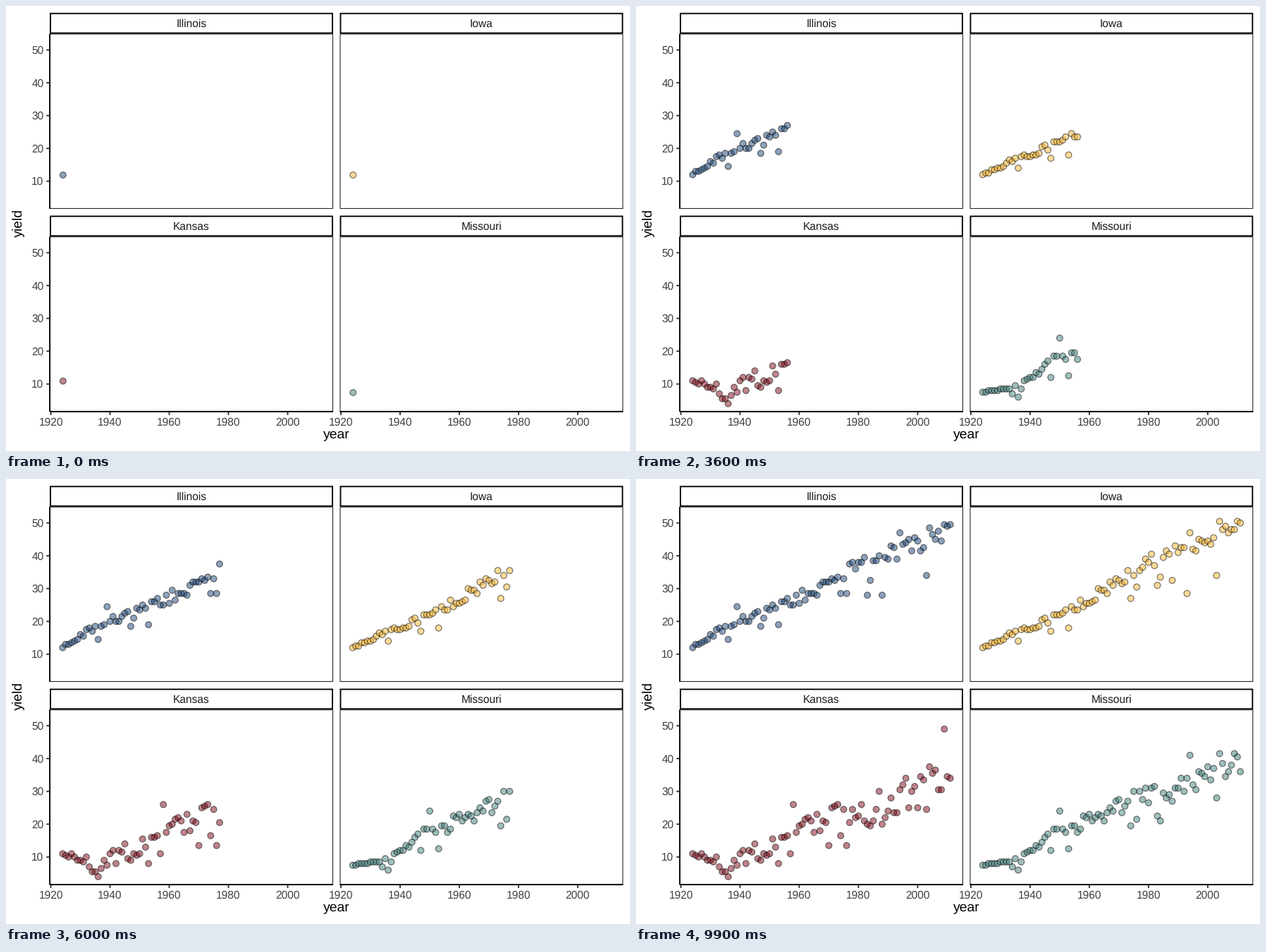
These frames come from a looping animation (885x632 px, 10000 ms). A matplotlib script:

```python
import matplotlib.pyplot as plt
import numpy as np
from matplotlib.animation import FuncAnimation
from matplotlib.collections import PatchCollection
from matplotlib.lines import Line2D
from matplotlib.patches import Circle, Rectangle

W, H, DPI = 885, 632, 100
FRAMES, INTERVAL = 100, 100
PT = 72 / DPI  # points per pixel

plt.rcParams["font.family"] = "Liberation Sans"
plt.rcParams["text.hinting"] = "none"

YEARS = np.arange(1924, 2012)
YEAR_PX, UNIT_PX = 4.199, 4.66
LEFTS, PANEL_W = (62.1, 473.5), 401.8
STRIP_TOP, PANEL_TOP, PANEL_BOTTOM, ROW_PITCH = 9.7, 39.4, 288.1, 288
TICK, LINE = 4.8, 1.88
SMALL, LARGE = 15.5, 19.4
RADIUS, STROKE = 4.38, 1.25

# Good and bad seasons felt in all four states
WEATHER = {1936: -3.5, 1947: -4.5, 1953: -4.5, 1974: -7, 1976: -5, 1983: -7.5,
           1984: -7.5, 1988: -8, 1994: 6, 2003: -9, 2004: 6}

# Name, colour, trend at even steps, spread, local seasons
STATES = [
    ("Illinois", "#1d4779", (12, 18.5, 21.5, 26, 30, 36, 40, 43.5, 48), 3,
     {1939: 5, 1988: -4}),
    ("Iowa", "#fbb932", (12, 16.5, 20.3, 25, 31, 37.5, 41.5, 45, 50.5), 2.5,
     {1993: -12, 2003: -5}),
    ("Kansas", "#810b19", (11, 7, 11.5, 14, 22.5, 22, 27, 30, 35), 6,
     {1958: 7, 1970: -7, 1988: 4, 2009: 9}),
    ("Missouri", "#41817d", (7.5, 8, 16, 20, 24.5, 28.5, 31, 35, 39), 3.5,
     {1950: 5, 1988: 4}),
]

rng = np.random.default_rng(12)
fig = plt.figure(figsize=(W / DPI, H / DPI), dpi=DPI, facecolor="white")
ax = fig.add_axes([0, 0, 1, 1])
ax.set_xlim(0, W)
ax.set_ylim(H, 0)
ax.axis("off")


def yields(trend, spread, local):
    """Trend plus noise that widens over time, plus unusual seasons."""
    steps = np.linspace(YEARS[0], YEARS[-1], len(trend))
    widening = np.sqrt(np.linspace(0, 1, len(YEARS)))
    values = np.interp(YEARS, steps, trend)
    values += spread * widening * rng.uniform(-1, 1, len(YEARS))
    for seasons in (WEATHER, local):
        for year, change in seasons.items():
            values[year - YEARS[0]] += change
    return np.clip(np.round(values * 2) / 2, 4, 52.5)


def year_x(col, year):
    return LEFTS[col] + (year - 1919.65) * YEAR_PX


def yield_y(row, value):
    return PANEL_BOTTOM + row * ROW_PITCH - (value - 1.575) * UNIT_PX


def line(x0, y0, x1, y1, color="black", z=1):
    ax.add_line(Line2D([x0, x1], [y0, y1], color=color, lw=LINE * PT, zorder=z,
                       solid_capstyle="butt", snap=False))


def box(x0, y0, x1, y1, width):
    """Outline drawn wholly inside the given edges."""
    ax.add_patch(Rectangle((x0 + width / 2, y0 + width / 2),
                           x1 - x0 - width, y1 - y0 - width, fill=False,
                           ec="black", lw=width * PT, joinstyle="miter",
                           snap=False))


def label(x, y, text, size=SMALL, color="#404040", ha="center", **kw):
    ax.text(x, y, text, fontsize=size * PT, color=color, ha=ha,
            va="baseline", **kw)


def panel(row, col, name, color, *model):
    x0, x1 = LEFTS[col], LEFTS[col] + PANEL_W
    dy = row * ROW_PITCH
    top, bottom = PANEL_TOP + dy, PANEL_BOTTOM + dy
    box(x0, top, x1, bottom, LINE / 2)
    box(x0, STRIP_TOP + dy, x1, top, LINE)
    label((x0 + x1) / 2, 30.3 + dy, name, color="#1a1a1a")

    if col == 0:
        line(x0, top, x0, bottom, z=4)
        for value in range(10, 51, 10):
            y = yield_y(row, value)
            line(x0 - TICK, y, x0, y, "#333333")
            label(53.5, y + 5.5, str(value), ha="right")
    if row == 1:
        line(x0, bottom, x1, bottom, z=4)
        for year in range(1920, 2001, 20):
            x = year_x(col, year)
            line(x, bottom, x, bottom + TICK, "#333333")
            label(x, 596.2, str(year))

    dots = [Circle((year_x(col, t), yield_y(row, v)), RADIUS)
            for t, v in zip(YEARS, yields(*model))]
    cloud = PatchCollection(dots[:1], facecolor=(color, 0.5),
                            edgecolor=("black", 0.5), linewidth=STROKE * PT,
                            zorder=3)
    ax.add_collection(cloud, autolim=False)
    return cloud, dots


panels = [panel(*divmod(i, 2), *state) for i, state in enumerate(STATES)]
label(468.7, 614, "year", LARGE, "black")
label(23.1, 307.8, "yield", LARGE, "black", rotation=90,
      rotation_mode="anchor")


def update(i):
    # Whole years only, so the reveal pauses now and then.
    shown = int(i * (len(YEARS) - 1) / (FRAMES - 1) + 0.44) + 1
    for cloud, dots in panels:
        cloud.set_paths(dots[:shown])
    return [cloud for cloud, _ in panels]


anim = FuncAnimation(fig, update, frames=FRAMES, interval=INTERVAL,
                     repeat=True, repeat_delay=0, blit=False)
plt.show()
```
